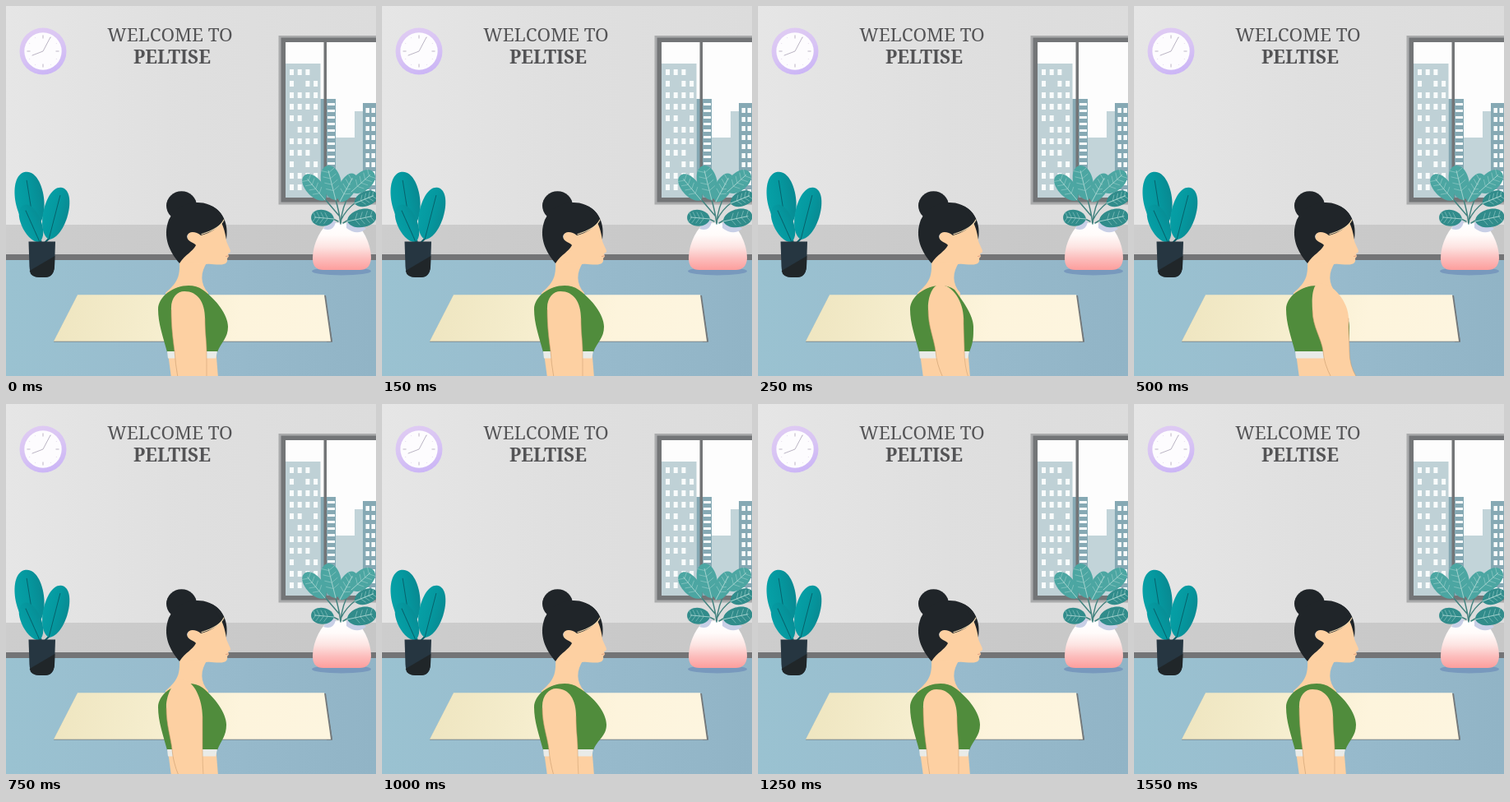
Animation of 450 by 450 pixels, one loop 1.75 s. Source, as an HTML page with a canvas:

```html
<!DOCTYPE html>
<html lang="en">
<head>
<meta charset="utf-8">
<title>Welcome</title>
<style>
html, body { margin: 0; width: 100%; height: 100%; overflow: hidden; background: #dedede; }
canvas { display: block; width: 450px; height: 450px; }
</style>
</head>
<body>
<canvas id="stage" width="450" height="450"></canvas>
<script>
const ctx = document.getElementById('stage').getContext('2d');
const LOOP = 1750, STEP = 250;
const SKIN = '#fdd0a2', HAIR = '#202529', GREEN = '#508c3c', EDGE = '#c99a6c';

const rect = (x, y, w, h, c) => { ctx.fillStyle = c; ctx.fillRect(x, y, w, h); };
const fill = (d, c) => { ctx.fillStyle = c; ctx.fill(new Path2D(d)); };
const line = (d, c, w = 1) => {
  ctx.strokeStyle = c;
  ctx.lineWidth = w;
  ctx.lineCap = 'round';
  ctx.stroke(new Path2D(d));
};
const oval = (x, y, rx, ry, c) => {
  ctx.fillStyle = c;
  ctx.beginPath();
  ctx.ellipse(x, y, rx, ry, 0, 0, Math.PI * 2);
  ctx.fill();
};
const blend = (x0, y0, x1, y1, ...colors) => {
  const g = ctx.createLinearGradient(x0, y0, x1, y1);
  colors.forEach((c, i) => g.addColorStop(i / (colors.length - 1), c));
  return g;
};

function drawRoom() {
  rect(0, 0, 450, 266, blend(0, 0, 450, 0, '#e6e6e6', '#dfdfdf', '#dcdcdc'));
  rect(0, 266, 450, 36, blend(0, 0, 450, 0, '#cdcdcd', '#cacaca', '#c7c7c7'));
  rect(0, 302, 450, 7, '#737476');
  rect(0, 309, 450, 141, blend(0, 0, 450, 0, '#9ac2d1', '#98bbcd', '#91b4c6'));
  fill('M388 351L397 408.5H390Z', '#74797b');
  fill('M58 408.5L87 352H389L397 408.5Z', '#74797b');
  fill('M87 351.3H387L395 407.8H58Z', blend(70, 350, 390, 400, '#efe6c1', '#f5edcd', '#fdf4dc', '#fdf5df'));
}

function drawClock() {
  oval(45, 55, 28.5, 28.5, blend(30, 28, 50, 84, '#dfcbf3', '#d8c4f4', '#cbb5f6'));
  oval(45, 55, 22.7, 22.7, '#fdfcfe');
  ctx.save();
  ctx.translate(45, 55);
  for (let i = 0; i < 12; i++) {
    const big = i % 3 === 0;
    rect(-0.4, -19.5, 0.8, big ? 4 : 1.2, big ? '#aca4b6' : '#e0d9e8');
    ctx.rotate(Math.PI / 6);
  }
  ctx.restore();
  line('M32 60L45 55L54 38', '#a9a1b4', 0.8);
}

function drawTitle() {
  ctx.fillStyle = '#545456';
  ctx.textAlign = 'center';
  ctx.textBaseline = 'alphabetic';
  ctx.font = '300 22.4px "Noto Serif", serif';
  ctx.fillText('WELCOME TO', 199.5, 42.8);
  ctx.font = 'bold 22.6px "Noto Serif", serif';
  ctx.fillText('PELTISE', 202, 69.8);
}

function panes(x, y, cols, rows, dx, dy, w, h, gap = 0) {
  for (let r = 0; r < rows; r++)
    for (let c = 0; c < cols; c++) {
      if (gap && (r * 3 + c * 5) % gap === 1) continue;
      rect(x + c * dx, y + r * dy, w, h, '#f8fbfb');
    }
}

function drawWindow() {
  rect(331.5, 36, 118.5, 205.5, '#aaabac');
  rect(334.5, 38.5, 115.5, 200, '#737577');
  rect(340, 44, 110, 189, '#fdfdfd');
  rect(340, 70, 42.5, 163, '#bfd1d6');
  rect(382.5, 113, 18.5, 120, '#86a9b4');
  rect(401, 160, 23, 73, '#c2d4d9');
  rect(424, 128, 10, 105, '#c2d4d9');
  rect(434, 118, 16, 115, '#86a9b4');
  panes(345, 77, 4, 11, 9.7, 14, 5, 7, 7);
  panes(391, 118, 1, 14, 0, 8, 9, 3);
  panes(437.5, 124, 2, 10, 7, 11, 4.5, 6);
  rect(386.5, 44, 3.5, 189, '#737577');
}

// A rounded leaf with its vein, growing from its base point.
function leaf(x, y, len, half, deg, color, vein, ribs = 0) {
  ctx.save();
  ctx.translate(x, y);
  ctx.rotate(deg * Math.PI / 180);
  const w = half * 1.33;
  fill(`M0 0C${-w} ${-len * .1} ${-w} ${-len} 0 ${-len}C${w} ${-len} ${w} ${-len * .1} 0 0Z`, color);
  line(`M0 0V${-len * .85}`, vein, 0.9);
  for (let i = 1; i <= ribs; i++) {
    const at = -len * (0.1 + i * 0.7 / ribs);
    line(`M${-half * .65} ${at - 4}L0 ${at}L${half * .65} ${at - 4}`, vein, 0.5);
  }
  ctx.restore();
}

function drawLeftPlant() {
  const teal = blend(-16, 0, 16, 0, '#06a0a6', '#05989f', '#088a92'), vein = '#08606a';
  line('M34 270Q42 280 43 289M52 283L46 289M41 285L43 289', '#0d5c66', 2);
  leaf(34.5, 271, 70, 17.5, -9, teal, vein);
  leaf(52, 284, 65, 15, 14.5, teal, vein);
  leaf(41, 287, 49, 12, -24, teal, vein);
  fill('M27.5 286.5H60L59 317Q58 330 47 330H41Q29 330 28.5 317Z', '#263641');
  fill('M28.7 322L59.4 304L59 317Q58 330 47 330H41Q30 330 28.7 322Z', '#202629');
}

function drawRightPlant() {
  oval(408, 322.5, 36, 5, '#7899bd');
  const glaze = blend(0, 264, 0, 322, '#ffffff', '#fffbfa', '#fde4e2', '#fcbcbb', '#fd9c9a');
  fill('M392 264H425C435 272 444 290 444 307Q443 321 430 321H386Q373 321 373 307C373 290 382 272 392 264Z', glaze);
  fill('M389 266Q400 258 401 263Q398 275 386 271Z', '#c8cfe6');
  fill('M414 264Q426 258 438 271Q427 280 414 270Z', '#c8cfe6');
  line('M407 265Q405 249 401 236M407 265Q408 245 420 224M407 261Q414 247 424 240M405 255L388 235M404 262L398 259M410 264L415 261', '#43837f', 1.5);
  const tint = '#4ca6a2', dark = '#318c8b', rib = '#a5d3cf';
  leaf(388, 236, 39, 10.5, -40, tint, rib, 4);
  leaf(401, 236, 43, 12, -14, tint, rib, 4);
  leaf(406, 238, 38, 10, 28, tint, rib, 4);
  leaf(420, 226, 36, 11, 48, tint, rib, 4);
  leaf(424, 240, 29, 9, 68, dark, rib, 4);
  leaf(399, 259, 28, 10, -85, dark, rib, 4);
  leaf(415, 262, 36, 11, 78, dark, rib, 4);
}

// top: shoulder peak; left, right: arm edges at three heights.
const base = { bust: 270, top: [217, 347], left: [201, 205, 209], right: [242, 244, 244] };
const poses = [
  base,
  { bust: 262, top: [221, 339], left: [207, 216, 225], right: [250, 251, 256] },
  { bust: 262, top: [226, 337], left: [217, 230, 240], right: [261, 262, 271] },
  { bust: 268, top: [213, 335], left: [195, 202, 210], right: [239, 239, 240] },
  { bust: 273, top: [212, 346], left: [195, 203, 209], right: [236, 238, 239] },
  base
];

function drawBody({ bust, top, left, right }) {
  const [x, y] = top, [l1, l2, l3] = left, [r1, r2, r3] = right;
  fill('M210 296C213 328 211 334 194 349V365H246V349C236 338 236 324 245 311Z', SKIN);
  fill('M196 415L201 452H258L255 415Z', SKIN);
  fill(`M222 340C204 340 185 353 185 369C185 386 191 402 196 421H257C262 408 ${bust} 404 ${bust} 390C${bust} 376 ${bust - 14} 357 239 345Q232 340 222 340Z`, GREEN);
  fill('M196 420H257L255 428.5H197Z', '#e9ebe8');
  const outer = `C${x + 16} ${y} ${r1} 360 ${r1} 380C${r1} 398 ${r2} 408 ${r2} 420Q${r2} 438 ${r3} 452`;
  const inner = `L${l3} 452Q${l2 + 1} 435 ${l2} 420C${l2 - 2} 404 ${l1} 390 ${l1} 370C${l1 - 1} 355 ${x - 9} ${y} ${x} ${y}Z`;
  fill(`M${x} ${y}${outer}${inner}`, SKIN);
  line(`M${l1} 370C${l1} 390 ${l2 - 2} 404 ${l2} 420Q${l2 + 1} 435 ${l3} 452`, EDGE, 0.6);
  line(`M${r1} 380C${r1} 398 ${r2} 408 ${r2} 420Q${r2} 438 ${r3} 452`, EDGE, 0.5);
}

function drawHead() {
  fill('M225 262L262 256C268 266 268 275 267.5 283C268 289 273 295 273 298.5Q273 300 270 301L271 304.5L269 307C270 312 267 314.5 260 314.5C253 314.5 248 313 244 314L214 312Z', SKIN);
  oval(213.5, 243, 18.5, 17.8, HAIR);
  fill('M198 260C206 243 224 237 240 239.5C252 242 261 249 265 259C260 270 248 276 237 279C231 274 222 273 220 280C220 287 230 288 231 291C227 299 218 302 211 313C199 299 190 281 198 260Z', HAIR);
  fill('M250 243C264 250 271 265 268 284C266 273 264 267 261 262Z', HAIR);
  line('M265 260Q260 271 238 277.5', '#eed8b0', 1.2);
  line('M267.5 304.5L270 304', '#dc9a7e', 0.9);
}

function frame(now) {
  const step = Math.floor((now % LOOP) / STEP);
  drawRoom();
  drawClock();
  drawTitle();
  drawWindow();
  drawLeftPlant();
  drawRightPlant();
  drawBody(poses[Math.min(step, poses.length - 1)]);
  drawHead();
}

const start = performance.now();
function tick() {
  frame(performance.now() - start);
  requestAnimationFrame(tick);
}
tick();
</script>
</body>
</html>
```
